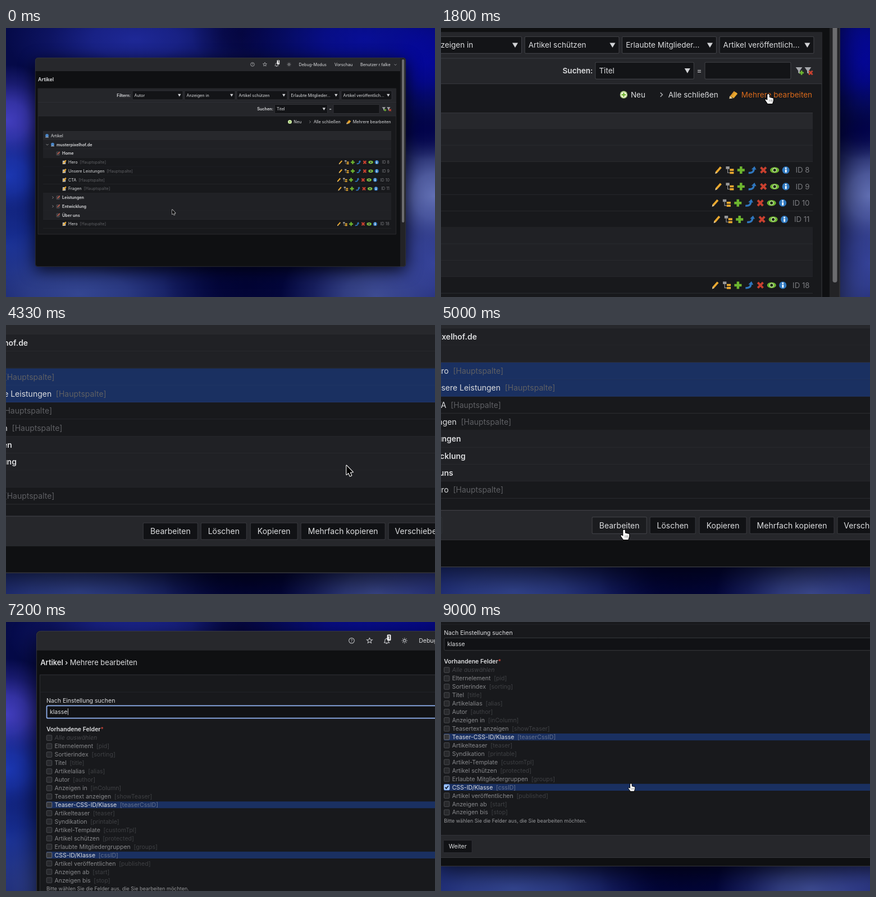
An HTML page with a canvas that plays this animation: 764x480 px, repeating every 9.07 s.

```html
<!DOCTYPE html>
<html lang="de">
<head>
<meta charset="utf-8">
<title>Mehrere bearbeiten</title>
<style>
html, body { margin: 0; width: 100%; height: 100%; overflow: hidden; background: #03033a; }
canvas { display: block; }
</style>
</head>
<body>
<canvas id="stage" width="764" height="480"></canvas>
<script>
const ctx = document.getElementById('stage').getContext('2d');
const LOOP = 9070;
const FONT = 'Inter, "Open Sans", sans-serif';
const INK = '#dcdddf', GRAY = '#5e5f63', LINE = '#36373c', BLUE = '#1a3061', ORANGE = '#eaa92f', GREEN = '#6db52f';

// Camera targets: start time, scale, offset x, offset y
const CAMERA = [[0, 1, 0, 0], [1050, 1.929, -663, -207.6], [3550, 1.929, -231.5, -390],
  [5000, 1.451, -21.5, -61], [7650, 1.451, -88.5, -182.5]];
// Pointer stops: time, x, y
const POINTER = [[0, 296, 324], [250, 296, 324], [1450, 643.6, 167], [2450, 643.6, 167], [3100, 614.5, 243.4],
  [3400, 614.5, 243.4], [3600, 612, 259], [3850, 612, 259], [4800, 289.5, 391.5], [7600, 289.5, 391.5], [8300, 294, 324.5]];
const EDIT_AT = 2300, FORM_AT = 5230, TYPE_AT = 5900, CHECK_AT = 8450;

const FIELDS = [['Alle auswählen'], ['Elternelement', 'pid'], ['Sortierindex', 'sorting'], ['Titel', 'title'],
  ['Artikelalias', 'alias'], ['Autor', 'author'], ['Anzeigen in', 'inColumn'], ['Teasertext anzeigen', 'showTeaser'],
  ['Teaser-CSS-ID/Klasse', 'teaserCssID'], ['Artikelteaser', 'teaser'], ['Syndikation', 'printable'],
  ['Artikel-Template', 'customTpl'], ['Artikel schützen', 'protected'], ['Erlaubte Mitgliedergruppen', 'groups'],
  ['CSS-ID/Klasse', 'cssID'], ['Artikel veröffentlichen', 'published'], ['Anzeigen ab', 'start'], ['Anzeigen bis', 'stop']];
// Tree rows: kind, label, article id
const TREE = [['root', 'Artikel'], ['site', 'musterpixelhof.de'], ['page', 'Home'], ['article', 'Hero', 8],
  ['article', 'Unsere Leistungen', 9], ['article', 'CTA', 10], ['article', 'Fragen', 11], ['closed', 'Leistungen'],
  ['closed', 'Entwicklung'], ['page', 'Über uns'], ['article', 'Hero', 18]];
const INDENT = { root: 80, site: 90, page: 100, closed: 100, article: 111 };
const ROW = 15.73;

const spring = ms => { const u = Math.max(0, ms) * 0.0058; return 1 - (1 + u) * Math.exp(-u); };
const ease = p => p * p * (3 - 2 * p);

function cameraAt(t) {
  return [1, 2, 3].map(k => CAMERA.slice(1).reduce(
    (v, stop, i) => v + (stop[k] - CAMERA[i][k]) * spring(t - stop[0]), CAMERA[0][k]));
}

function pointerAt(t) {
  const i = POINTER.findIndex(p => p[0] > t);
  if (i < 0) return POINTER.at(-1).slice(1);
  const [a, b] = [POINTER[i - 1], POINTER[i]];
  const p = ease((t - a[0]) / (b[0] - a[0]));
  return [a[1] + (b[1] - a[1]) * p, a[2] + (b[2] - a[2]) * p];
}

function box(x0, y0, x1, y1, fill, stroke, radius = 0, width = 0.6) {
  ctx.beginPath();
  ctx.roundRect(x0, y0, x1 - x0, y1 - y0, radius);
  if (fill) { ctx.fillStyle = fill; ctx.fill(); }
  if (stroke) { ctx.strokeStyle = stroke; ctx.lineWidth = width; ctx.stroke(); }
}

function text(str, x, y, color = INK, { size = 7.25, style = '', align = 'left' } = {}) {
  ctx.font = `${style} ${size}px ${FONT}`;
  ctx.textAlign = align;
  ctx.fillStyle = color;
  ctx.fillText(str, x, y + size * 0.36);
  return ctx.measureText(str).width;
}

function poly(points, color, fill = true, width = 1) {
  ctx.beginPath();
  points.forEach(([x, y]) => ctx.lineTo(x, y));
  if (fill) { ctx.closePath(); ctx.fillStyle = color; ctx.fill(); }
  else { ctx.strokeStyle = color; ctx.lineWidth = width; ctx.stroke(); }
}

function disc(x, y, r, fill, stroke, width = 0.7) {
  ctx.beginPath();
  ctx.arc(x, y, r, 0, 7);
  if (fill) { ctx.fillStyle = fill; ctx.fill(); }
  if (stroke) { ctx.strokeStyle = stroke; ctx.lineWidth = width; ctx.stroke(); }
}

function icon(name, x, y, scale = 1) {
  ctx.save();
  ctx.translate(x, y);
  ctx.scale(scale, scale);
  ICONS[name]();
  ctx.restore();
}

const ICONS = {
  pencil() {
    poly([[-2.2, 2.2], [2.2, -2.8]], ORANGE, false, 2);
    poly([[-3.3, 3.6], [-2.9, 1.4], [-1.3, 2.8]], '#e8cf9d');
  },
  pencils() {
    poly([[-2.4, 2], [1.4, -2.8]], '#d9952a', false, 2.2);
    poly([[-0.8, 2.6], [3, -1.8]], ORANGE, false, 2.4);
    poly([[-4, 3.9], [-3.6, 1.2], [-0.6, 3.4]], '#e8cf9d');
  },
  tree() {
    box(-3.7, -3.5, -0.3, -1, '#999');
    poly([[-2, -1], [-2, 2.5], [0, 2.5]], '#999', false, 0.6);
    box(0, -1.2, 3.8, 0.8, ORANGE);
    box(0, 1.6, 3.8, 3.6, ORANGE);
  },
  plus() { box(-3.5, -1.2, 3.5, 1.2, GREEN); box(-1.2, -3.5, 1.2, 3.5, GREEN); },
  move() {
    ctx.beginPath();
    ctx.moveTo(-3.5, 2.6);
    ctx.quadraticCurveTo(1.4, 3, 1.6, -1);
    ctx.strokeStyle = '#2f76bd'; ctx.lineWidth = 1.8; ctx.stroke();
    poly([[-0.8, -0.7], [2.2, -3.7], [3.9, -0.4]], '#2f76bd');
  },
  remove() {
    poly([[-2.5, -2.6], [2.5, 2.6]], '#c9402f', false, 2.1);
    poly([[2.5, -2.6], [-2.5, 2.6]], '#c9402f', false, 2.1);
  },
  eye() {
    ctx.beginPath();
    ctx.ellipse(0, 0, 4.3, 2.8, 0, 0, 7);
    ctx.fillStyle = GREEN; ctx.fill();
    disc(0, 0, 1.7, '#1c2a12', '#d6efb8', 0.6);
  },
  info() {
    disc(0, 0, 3.5, '#2f78bf');
    box(-0.7, -0.6, 0.8, 2.3, '#fff');
    disc(0, -1.8, 0.8, '#fff');
  },
  site() { disc(0, -0.6, 2.9, '#4b87c9'); box(-2.8, 1.8, 2.8, 3.2, '#a9b4c2'); },
  page() {
    box(-3, -2.8, 2.2, 3.2, '#34363a', '#63656a', 0.5);
    poly([[-1.4, 1.4], [2.8, -3]], '#d5604e', false, 1.4);
  },
  article() { box(-3.2, -2.8, 2.2, 3.4, '#b9babd'); icon('pencil', 0.4, -0.4, 1.1); },
  add() {
    disc(0, 0, 3.6, '#a3c877');
    disc(0, 0, 2.8, '#f0f3d8');
    box(-2, -0.6, 2, 0.6, GREEN);
    box(-0.6, -2, 0.6, 2, GREEN);
  },
  back() { poly([[-3.8, 0], [0, -3.6], [0, -1.6], [3.8, -1.6], [3.8, 1.6], [0, 1.6], [0, 3.6]], GREEN); },
  funnel() { poly([[-3.3, -3.3], [3, -3.3], [0.7, 0], [0.7, 3], [-0.9, 2], [-0.9, 0]], '#a6a8ac'); },
  down() { poly([[-2.7, -2.2], [2.7, -2.2], [0, 2.4]], '#d2d3d6'); },
  chevron() { poly([[-1, -2], [1, 0], [-1, 2]], '#a9aaad', false, 0.8); },
  chevronDown() { poly([[-2, -1], [0, 1], [2, -1]], '#a9aaad', false, 0.8); },
  help() { disc(0, 0, 3.3, null, '#c9cacd'); text('?', 0, 0, '#c9cacd', { size: 5, align: 'center' }); },
  star() {
    const tips = Array.from({ length: 11 }, (_, i) => {
      const a = i * Math.PI / 5, r = i % 2 ? 1.6 : 3.6;
      return [r * Math.sin(a), -r * Math.cos(a)];
    });
    poly(tips, '#c9cacd', false, 0.7);
  },
  bell() {
    poly([[-3.2, 2], [-2.2, 0.8], [-2, -1.8], [0, -3.3], [2, -1.8], [2.2, 0.8], [3.2, 2], [-3.2, 2]], '#c9cacd', false, 0.7);
    box(-1, 2.8, 1, 3.4, '#c9cacd');
    box(0.6, -8, 5.2, -0.6, '#f4f4f5', null, 1);
    text('1', 2.9, -4.3, '#111', { size: 6, style: '600', align: 'center' });
  },
  sun() {
    disc(0, 0, 1.5, null, '#c9cacd');
    for (let a = 0; a < 6.2; a += Math.PI / 4)
      poly([2.5, 3.5].map(r => [r * Math.cos(a), r * Math.sin(a)]), '#c9cacd', false, 0.7);
  }
};

function blob(x, y, rx, ry, rgb, alpha = 1) {
  ctx.save();
  ctx.translate(x, y);
  ctx.scale(rx, ry);
  const g = ctx.createRadialGradient(0, 0, 0, 0, 0, 1);
  [1, 0.78, 0.32, 0].forEach((a, i) => g.addColorStop(i / 3, `rgb(${rgb} / ${a * alpha})`));
  ctx.fillStyle = g;
  ctx.fillRect(-1, -1, 2, 2);
  ctx.restore();
}

// The wallpaper stays fixed while the camera moves the window above it.
function drawWallpaper() {
  ctx.fillStyle = '#050a48';
  ctx.fillRect(0, 0, 764, 480);
  blob(230, 20, 230, 100, '30 40 150');
  blob(420, 10, 90, 70, '4 4 60', 0.8);
  blob(640, 20, 220, 110, '8 14 150');
  blob(750, 60, 100, 110, '4 6 165', 0.8);
  blob(0, 165, 120, 100, '66 62 190');
  blob(0, 265, 120, 90, '28 56 180');
  blob(0, 390, 200, 130, '24 48 150');
  blob(130, 475, 260, 120, '52 70 145');
  blob(430, 460, 150, 90, '2 4 52');
  blob(660, 480, 170, 130, '62 76 145');
  blob(764, 300, 120, 120, '98 112 180');
  blob(764, 420, 140, 120, '58 72 160', 0.9);
  blob(750, 185, 70, 50, '2 2 76', 0.8);
}

function drawChrome() {
  box(52, 53, 712, 426, '#0f1012');
  box(52, 53, 712, 77, '#27282c');
  icon('help', 439, 65);
  icon('star', 461, 65);
  icon('bell', 482, 65.5);
  icon('sun', 504, 65);
  text('Debug-Modus', 521.5, 65);
  text('Vorschau', 585, 65);
  text('Benutzer r.falke', 631, 65);
  icon('chevronDown', 693.5, 65.5);
}

function drawScrollbar() {
  box(702, 53, 712, 426, '#232326');
  box(705, 56, 709.3, 347, '#6c6c6f', null, 2);
}

function drawSelect(x0, y0, x1, label) {
  box(x0, y0, x1, y0 + 16, '#131417', '#3e3f44', 1);
  text(label, x0 + 3.5, y0 + 8);
  icon('down', x1 - 6.2, y0 + 8);
}

function drawCheckbox(x, y, checked, alpha = 1) {
  ctx.globalAlpha = alpha;
  box(x - 3.3, y - 3.3, x + 3.3, y + 3.3, checked ? '#9cc3ff' : '#36373b', checked ? '#9cc3ff' : '#77787c', 1);
  if (checked) poly([[x - 1.9, y], [x - 0.5, y + 1.6], [x + 2, y - 1.8]], '#111a2c', false, 1.2);
  ctx.globalAlpha = 1;
}

function drawFilters() {
  box(57, 108, 694.6, 157, '#25262a');
  box(57, 132.4, 694.6, 133, LINE);
  text('Filtern:', 222, 120, INK, { style: '600', align: 'right' });
  ['Autor', 'Anzeigen in', 'Artikel schützen', 'Erlaubte Mitglieder...', 'Artikel veröffentlich...']
    .forEach((label, i) => drawSelect(225 + 93 * i, 112, 315 + 93 * i, label));
  text('Suchen:', 476, 144.5, INK, { style: '600', align: 'right' });
  drawSelect(478.4, 136.5, 572.5, 'Titel');
  text('=', 577.7, 144.5, INK, { align: 'center' });
  box(583, 136.5, 665, 152.5, '#131417', '#3e3f44', 1);
  icon('funnel', 673, 144.5);
  icon('funnel', 681.5, 144.5);
  icon('plus', 675.3, 146.5, 0.6);
  icon('remove', 684, 146.5, 0.7);
}

function drawToolbar(edit, hover) {
  if (edit) {
    icon('back', 585, 167.5);
    text('Zurück', 591.7, 167.5);
    icon('chevron', 631.5, 167.5);
    text('Alle schließen', 638, 167.5);
    text('Alle auswählen', 672, 183.6, GRAY, { size: 6.9, align: 'right' });
    drawCheckbox(678.5, 183.6);
    return;
  }
  icon('add', 505.5, 167.5);
  text('Neu', 512.2, 167.5);
  icon('chevron', 541.5, 167.5);
  text('Alle schließen', 548, 167.5);
  icon('pencils', 610.3, 167.5);
  text('Mehrere bearbeiten', 617.8, 167.5, hover ? '#d8691b' : INK);
}

function drawTreeRow([kind, label, id], top, edit, active, checked) {
  const y = top + 7.8, x = INDENT[kind];
  const article = kind === 'article';
  box(66, top, 686, top + ROW, active ? BLUE : article ? '#18191c' : kind === 'root' ? '#27282c' : '#202125');
  box(66, top + ROW - 0.45, 686, top + ROW, active ? '#23396b' : '#2b2c30');
  icon(article || kind === 'site' ? kind : kind === 'root' ? 'site' : 'page', x - 7, y);
  if (kind === 'site') icon('chevronDown', 73.5, y);
  if (kind === 'closed') icon('chevron', 83.5, y);
  const width = text(label, x, y, INK, { style: article || kind === 'root' ? '' : '600' });
  if (!article) return;
  text('[Hauptspalte]', x + width + 4, y, GRAY);
  if (edit) return drawCheckbox(678.5, y, checked);
  const idWidth = text('ID ' + id, 683, y, '#7a7b7f', { size: 7.1, align: 'right' });
  ['pencil', 'tree', 'plus', 'move', 'remove', 'eye', 'info']
    .forEach((name, i) => icon(name, 683 - idWidth - 73.5 + 10.7 * i, y));
}

function drawButton(x0, y0, x1, label, lit) {
  box(x0, y0, x1, y0 + 15.4, lit ? '#1b1c1f' : '#111215', lit ? '#3e3f44' : '#34353a', 1);
  text(label, (x0 + x1) / 2, y0 + 7.7, INK, { align: 'center' });
}

function drawList(t, [px, py]) {
  const edit = t >= EDIT_AT;
  const top = edit ? 189.5 : 184.6;
  text('Artikel', 57, 92, INK, { size: 8.9, style: '600' });
  box(57, 108, 694.6, edit ? 400.7 : 368, '#18191c', LINE);
  drawFilters();
  box(57, 156.7, 694.6, 157.3, LINE);
  drawToolbar(edit, px > 612 && py < 175);
  const selectedAt = { 3: 3350, 4: 3750 };
  TREE.forEach((row, i) => {
    const y = top + ROW * i;
    const checked = t >= selectedAt[i];
    const hover = row[0] === 'article' && px < 686 && py >= y && py < y + ROW;
    drawTreeRow(row, y, edit, hover || checked, checked);
  });
  box(66, top, 686, top + 0.5, LINE);
  if (edit) {
    box(57, 373.3, 694.6, 400.7, '#26272b');
    box(57, 373.1, 694.6, 373.7, '#3d3e43');
    drawButton(66, 379.6, 121, '');
    drawButton(260, 379.6, 310.3, 'Bearbeiten', py > 379 && px < 310);
    drawButton(313.4, 379.6, 355.4, 'Löschen');
    drawButton(359, 379.6, 402.5, 'Kopieren');
    drawButton(405.6, 379.6, 483.4, 'Mehrfach kopieren');
    drawButton(486.5, 379.6, 541, 'Verschieben');
    drawButton(544, 379.6, 607, 'Überschreiben');
  }
}

function drawField([label, key], i, filtering, checked) {
  const y = 184.5 + 10.3 * i;
  const match = filtering && label.includes('Klasse');
  const dim = filtering && !match;
  if (match) box(64.4, y - 4.2, 687, y + 4.2, BLUE);
  drawCheckbox(67.9, y, checked, dim ? 0.55 : 1);
  if (!key) return text(label, 74.4, y, dim ? '#444549' : '#67686c', { style: 'italic' });
  const width = text(label, 74.4, y, dim ? '#87888b' : INK);
  text(`[${key}]`, 74.4 + width + 4, y, dim ? '#3f4044' : match ? '#65718c' : GRAY);
}

function drawForm(t) {
  const typed = 'klasse'.slice(0, Math.max(0, Math.ceil((t - TYPE_AT) / 140)));
  const focused = t < CHECK_AT;
  const width = text('Artikel › ', 57, 91.8, INK, { size: 8.9, style: '600' });
  text('Mehrere bearbeiten', 57 + width, 91.8, INK, { size: 8.9 });
  box(56.4, 107, 694.6, 415.2, '#18191c', LINE);
  box(56.4, 128, 694.6, 128.5, '#27282c');
  text('Nach Einstellung suchen', 64.4, 138.9);
  box(64.8, 145, 687, 160.4, '#111215', focused ? '#92b4f4' : '#3e3f44', 1.4, focused ? 1.2 : 0.6);
  const caret = 68.6 + text(typed, 68.6, 152.4);
  if (focused) box(caret + 0.3, 148.4, caret + 0.9, 156.4, INK);
  const heading = text('Vorhandene Felder', 64.4, 174, INK, { style: '600' });
  text('*', 64.4 + heading, 174, '#e0493c');
  FIELDS.forEach((field, i) => drawField(field, i, typed.length > 1, i === 14 && t >= CHECK_AT));
  text('Bitte wählen Sie die Felder aus, die Sie bearbeiten möchten.', 64.4, 369.8, '#97989b', { size: 6.2 });
  box(56.4, 387.7, 694.6, 415.2, '#26272b', LINE);
  drawButton(63.7, 393.8, 98.9, 'Weiter');
}

const ARROW = [[0, 0], [0, 8.4], [1.9, 6.7], [3.2, 9.8], [4.6, 9.2], [3.3, 6.2], [5.9, 6.1]];
const HAND = [[-0.9, 0.4], [0, -0.3], [0.9, 0.4], [1, 3], [4.7, 3.9], [4.7, 6.2], [3.8, 9], [-0.6, 9],
  [-3, 5.6], [-2.6, 4.7], [-0.9, 5.8]];

function drawPointer(t, [x, y]) {
  const overLink = x > 612 && y < 175;
  const overButton = y > 380 && x < 310;
  const hand = t < FORM_AT ? overLink || overButton : t > 8150;
  ctx.save();
  ctx.translate(x, y);
  ctx.lineJoin = 'round';
  ctx.beginPath();
  (hand ? HAND : ARROW).forEach(p => ctx.lineTo(...p));
  ctx.closePath();
  ctx.strokeStyle = hand ? '#000' : '#fff';
  ctx.lineWidth = 1.1;
  ctx.stroke();
  ctx.fillStyle = hand ? '#fff' : '#000';
  ctx.fill();
  if (hand) [1, 2.3, 3.5].forEach(fx => box(fx - 0.15, 5, fx + 0.15, 7.2, '#333'));
  ctx.restore();
}

function render(t) {
  const [scale, dx, dy] = cameraAt(t);
  const pointer = pointerAt(t);
  ctx.setTransform(1, 0, 0, 1, 0, 0);
  drawWallpaper();
  ctx.setTransform(scale, 0, 0, scale, dx, dy);

  ctx.save();
  ctx.shadowColor = 'rgba(0, 0, 0, 0.75)';
  ctx.shadowBlur = 28 * scale;
  ctx.shadowOffsetY = 7 * scale;
  box(52, 53, 712, 426, '#0f1012', null, 5);
  ctx.restore();

  ctx.save();
  ctx.beginPath();
  ctx.roundRect(52, 53, 660, 373, 5);
  ctx.clip();
  drawChrome();
  if (t < FORM_AT) drawList(t, pointer);
  else drawForm(t);
  drawScrollbar();
  ctx.restore();

  box(52.3, 53.3, 711.7, 425.7, null, '#3c3d45', 5);
  if (t < FORM_AT + 150 || t > 7600) drawPointer(t, pointer);
}

function frame(now) {
  render(now % LOOP);
  requestAnimationFrame(frame);
}
requestAnimationFrame(frame);
</script>
</body>
</html>
```
